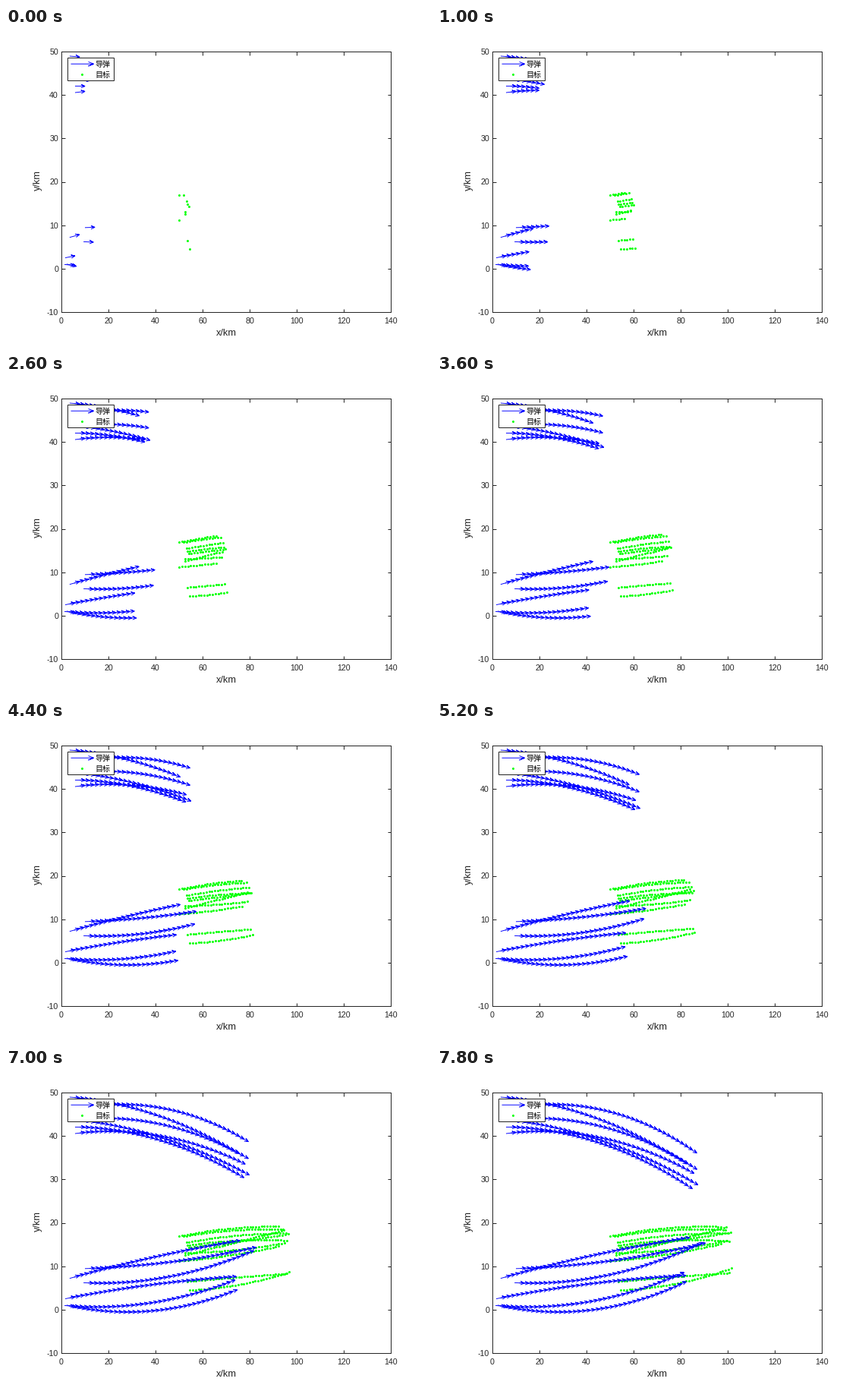
These frames come from a looping animation (560x420 px, 8 s). A matplotlib script:

```python
import numpy as np
import matplotlib.pyplot as plt
from matplotlib.animation import FuncAnimation
from matplotlib.collections import LineCollection
from matplotlib.patches import Rectangle

W, H, DPI = 560, 420, 100
PX = 72 / DPI                      # one pixel in points
STEPS = 40
BLUE, GREEN, INK = "#0000ff", "#00ff00", "#262626"
LEFT, TOP, WIDE, TALL = 73, 31, 434, 343  # plot box in pixels
SCALE = np.array([WIDE / 140, TALL / 60])  # pixels per km

plt.rcParams.update({
    "font.family": "Liberation Sans",
    "axes.unicode_minus": False,
    "axes.linewidth": PX,
    "axes.edgecolor": INK,
})

# Every body: start x, start y (km), first and last heading (degrees)
MISSILES = [
    (3.5, 48.95, -2.6, -18.6),
    (7.4, 46.2, 6.2, -19.4),
    (7.4, 43.7, 3.2, -18.4),
    (8.1, 43.6, -3.7, -16.9),
    (5.8, 42.05, -0.5, -18.9),
    (5.8, 40.55, 3.7, -15.8),
    (3.5, 7.2, 8.6, 4.9),
    (10.0, 9.45, 0.9, 7.1),
    (9.4, 6.2, -1.5, 13.9),
    (1.6, 2.5, 6.0, 1.8),
    (1.3, 0.95, -2.8, 12.8),
    (2.2, 1.05, -7.0, 13.6),
]
TARGETS = [
    (50.0, 16.9, 6.6, -1.3),
    (52.0, 16.9, 5.3, -1.7),
    (53.1, 15.5, 5.6, -0.5),
    (53.4, 14.8, 4.6, -2.2),
    (54.1, 14.3, 3.6, 4.9),
    (52.5, 13.1, 0.5, 6.3),
    (52.7, 12.6, 7.8, 7.8),
    (50.1, 11.2, 2.6, 7.1),
    (53.6, 6.5, 2.8, 2.0),
    (54.6, 4.5, 1.5, 10.7),
]
MISSILE_SPEED, TARGET_SPEED = 1.965, 1.21  # km per step
ARROW_KM = 4.2


def fly(x, y, first, last, speed):
    """Path at constant speed and turn rate: positions and unit headings."""
    turn = np.radians(np.linspace(first, last, STEPS))
    mid = (turn[1:] + turn[:-1]) / 2
    moves = speed * np.column_stack([np.cos(mid), np.sin(mid)])
    pos = np.vstack([[0, 0], np.cumsum(moves, axis=0)]) + (x, y)
    return pos, np.column_stack([np.cos(turn), np.sin(turn)])


def arrow(start, tip, length=5.0, half=2.2):
    """Open-headed arrow as one polyline, in pixels."""
    start, tip = np.asarray(start, float), np.asarray(tip, float)
    along = (tip - start) / np.hypot(*(tip - start))
    side = np.array([-along[1], along[0]])
    back = tip - along * length
    return np.array([start, tip, back + side * half, tip, back - side * half])


def lines(segments):
    return LineCollection(segments, colors=BLUE, linewidths=0.92 * PX,
                          joinstyle="bevel", zorder=4)


arrows = []
for body in MISSILES:
    pos, ahead = fly(*body, MISSILE_SPEED)
    arrows.append([arrow(p * SCALE, (p + ARROW_KM * a) * SCALE) / SCALE
                   for p, a in zip(pos, ahead)])
dots = np.array([fly(*body, TARGET_SPEED)[0] for body in TARGETS])

fig = plt.figure(figsize=(W / DPI, H / DPI), dpi=DPI, facecolor="white")

ax = fig.add_axes([LEFT / W, (H - TOP - TALL) / H, WIDE / W, TALL / H])
ax.set(xlim=(0, 140), ylim=(-10, 50),
       xticks=range(0, 141, 20), yticks=range(-10, 51, 10))
ax.tick_params(direction="in", top=True, right=True, length=4.5 * PX,
               width=PX, color=INK, labelcolor=INK, labelsize=10.67 * PX)
ax.tick_params(axis="x", pad=7.3 * PX)
ax.tick_params(axis="y", pad=4 * PX)

# Overlay in pixel units for labels and legend
stage = fig.add_axes([0, 0, 1, 1], zorder=5)
stage.set(xlim=(0, W), ylim=(H, 0))
stage.axis("off")
label = dict(fontsize=12.8 * PX, color=INK, ha="center", va="center")
stage.text(290, 402, "x/km", **label)
stage.text(42.3, 201, "y/km", rotation=90, **label)

stage.add_patch(Rectangle((81, 39), 61, 30, facecolor="white",
                          edgecolor=INK, linewidth=PX, zorder=3))
stage.add_collection(lines([arrow((85.5, 47.3), (115.5, 47.3), 7, 2.8)]))
dot = dict(ls="", marker="o", ms=3 * PX, mew=0, color=GREEN, snap=False)
stage.plot([100], [61], zorder=4, **dot)
for y, word in ((46.7, "导弹"), (60.7, "目标")):
    stage.text(117.2, y, word, family="Noto Sans CJK JP", fontsize=10 * PX,
               color="black", ha="left", va="center_baseline", zorder=4)

trails = lines([])
ax.add_collection(trails)
(marks,) = ax.plot([], [], zorder=3, **dot)


def draw(n):
    trails.set_segments([a for path in arrows for a in path[:n + 1]])
    marks.set_data(*dots[:, :n + 1].reshape(-1, 2).T)
    return trails, marks


anim = FuncAnimation(fig, draw, frames=STEPS, interval=200,
                     init_func=lambda: draw(0), repeat=True, repeat_delay=0)
plt.show()
```
